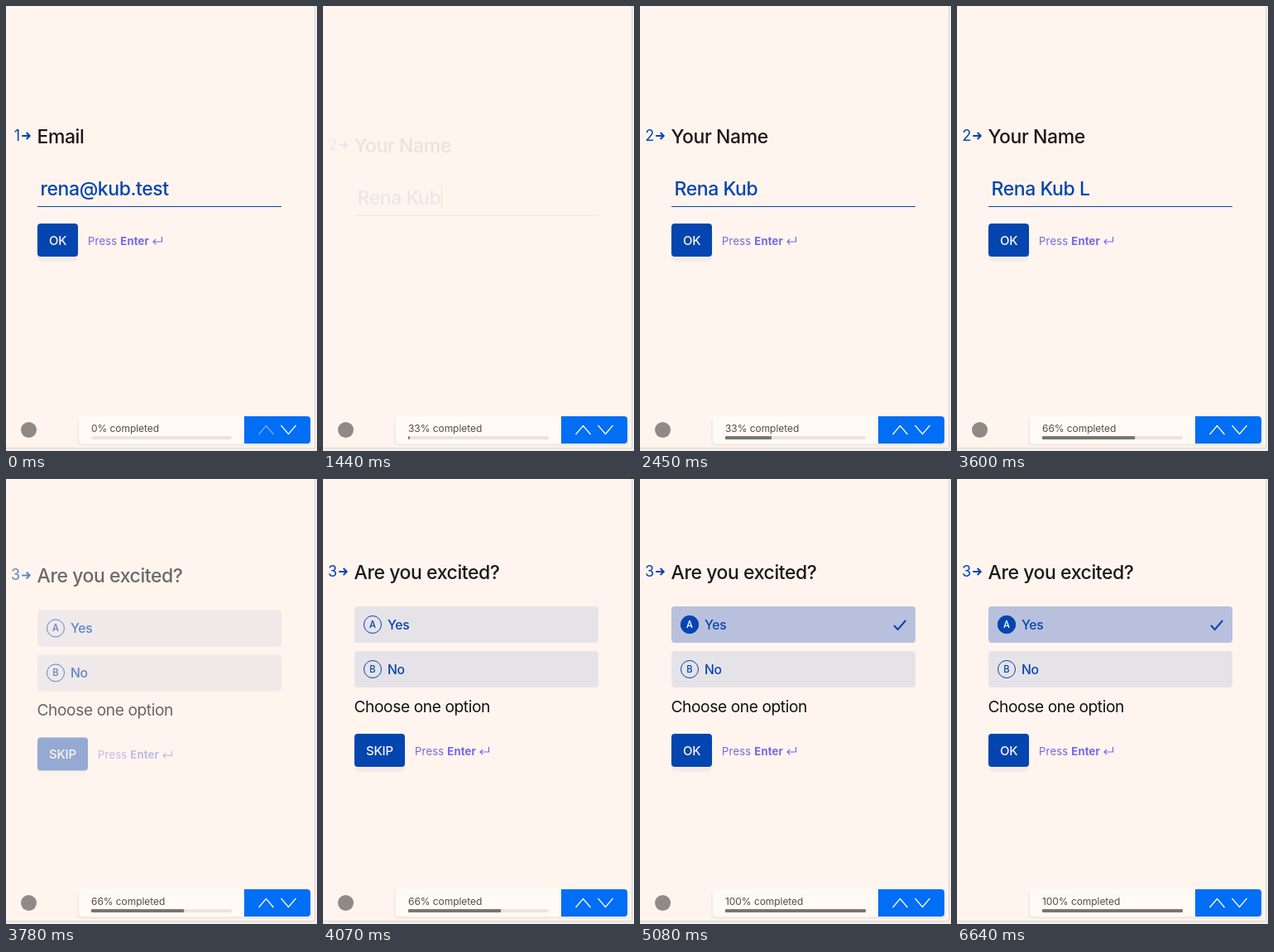
An HTML page that plays this animation: 376 px wide and 538 px high, repeating every 7480 ms.

```html
<!DOCTYPE html>
<html lang="en">
<head>
<meta charset="utf-8">
<title>Form walkthrough</title>
<style>
  html, body { margin: 0; width: 100%; height: 100%; overflow: hidden; background: #f1eeee; }
  svg { display: block; width: 376px; height: 538px; font-family: Inter, "Liberation Sans", sans-serif; font-optical-sizing: none; }
  text { white-space: pre; }
  .title, .answer { font-size: 23px; font-weight: 500; letter-spacing: -.43px; }
  .title { fill: #191919; }
  .answer, .num, .opt, .key { fill: #0445af; }
  .num { font-size: 18px; text-anchor: end; }
  .opt { font-size: 15.7px; font-weight: 500; letter-spacing: -.25px; }
  .key { font-size: 11.2px; font-weight: 500; text-anchor: middle; }
  .note { font-size: 19.2px; letter-spacing: -.42px; fill: #111; }
  .btn { font-size: 15px; font-weight: 500; letter-spacing: -.2px; fill: #fff6f0; }
  .hint { font-size: 13px; letter-spacing: .22px; fill: #6f66ee; }
  .hint tspan { font-weight: 700; }
  .small { font-size: 12px; letter-spacing: -.06px; fill: #514d49; }
  .line { fill: none; stroke: #0445af; stroke-width: 2; }
</style>
</head>
<body>
<svg id="stage" viewBox="0 0 376 538"></svg>
<script>
const LOOP = 7480, TICK = 57.5;
const BLUE = '#0445af';
const stage = document.getElementById('stage');

const text = (cls, x, y, s, extra = '') => `<text class="${cls}" x="${x}" y="${y}" ${extra}>${s}</text>`;
const rect = (x, y, w, h, fill, rx = 0, extra = '') =>
  `<rect x="${x}" y="${y}" width="${w}" height="${h}" rx="${rx}" fill="${fill}" ${extra}/>`;

const heading = (n, title, y) =>
  text('num', 17.2, y - 3, n) +
  `<path class="line" d="M19.2 ${y - 9}H28.5M24.7 ${y - 13}l4 4l-4 4"/>` +
  text('title', 37.5, y, title);

const button = (label, y, w, id = '') =>
  `<g id="${id}">` +
  rect(37, y + 3, w + 2, 43, '#000', 7, 'opacity=".04"') +
  rect(38, y, w, 40, BLUE, 4) +
  text('btn', 52, y + 26, label) +
  text('hint', w + 50, y + 26, 'Press <tspan>Enter</tspan>') +
  `<path d="M${w + 139.5} ${y + 16}v6h-10.5m3.2 -3.2l-3.2 3.2l3.2 3.2" fill="none" stroke="#6f66ee" stroke-width="1.2"/>` +
  '</g>';

const page = (id, body, foot) => `<g id="${id}"><g id="${id}Main">${body}</g><g id="${id}Foot">${foot}</g></g>`;

const field = (id, value) =>
  text('answer', 41.5, 229, value, `id="${id}"`) + rect(38, 242, 295, 1, BLUE);

const option = (key, label, y, pick = '') =>
  rect(38, y, 295, 44, '#e6e3e8', 4) + pick +
  `<circle cx="60" cy="${y + 22}" r="10.5" fill="none" stroke="${BLUE}"/>` +
  text('key', 60, y + 26, key, `id="key${key}"`) +
  text('opt', 78, y + 28, label);

const picked = '<g id="picked">' + rect(38, 154, 295, 44, '#b9c0dd', 4) +
  `<circle cx="60" cy="176" r="11" fill="${BLUE}"/><path class="line" d="M307 177l4.7 5l9.5 -11"/></g>`;

stage.innerHTML =
  rect(0, 0, 376, 538, '#f1eeee') +
  rect(-2, -2, 375.5, 536.5, '#fff5ee', 0, 'stroke="#dcd6d3"') +
  page('p1', heading(1, 'Email', 166) + field('mail', 'rena@kub.test'), button('OK', 263, 49)) +
  page('p2', heading(2, 'Your Name', 166) + field('name', '') + rect(143, 206, 1, 28, '#222', 0, 'id="caret"'),
    button('OK', 263, 49)) +
  page('p3', heading(3, 'Are you excited?', 121) + option('A', 'Yes', 154, picked) + option('B', 'No', 208) +
    text('note', 37.5, 282, 'Choose one option'),
    button('SKIP', 308, 61, 'skip') + button('OK', 308, 49, 'done')) +
  '<circle id="dot" cx="27.5" cy="512.5" r="9.5" fill="#8f8a86"/>' +
  rect(86, 498, 284, 34, '#000', 5, 'opacity=".04"') +
  rect(88, 496, 204, 33, '#fffaf4', 4) +
  `<path d="M288 496h76a4 4 0 0 1 4 4v25a4 4 0 0 1 -4 4h-76z" fill="#006ef5"/>` +
  text('small', 103, 515, '', 'id="percent"') +
  rect(103, 520, 170, 4, '#e9e4de', 2) + rect(103, 520, 0, 4, '#7a7570', 1, 'id="bar"') +
  '<g fill="none" stroke="#fff" stroke-width="1.3"><path id="up" d="M305.5 518l9 -10.5l9 10.5"/><path d="M332.5 507l9 10.5l9 -10.5"/></g>';

const el = {};
stage.querySelectorAll('[id]').forEach(n => { if (n.id) el[n.id] = n; });
const set = (id, name, value) => el[id].setAttribute(name, value);
const show = (id, on) => set(id, 'visibility', on ? 'visible' : 'hidden');
const write = (id, s) => { if (el[id].textContent !== s) el[id].textContent = s; };

const unit = (t, start, len) => Math.min(1, Math.max(0, (t - start) / len));
const easeOut = u => 1 - (1 - u) ** 2;

// cubic-bezier(.25, .1, .25, 1)
function ease(u) {
  const curve = (s, a, b) => 3 * a * s * (1 - s) ** 2 + 3 * b * s * s * (1 - s) + s ** 3;
  let lo = 0, hi = 1;
  for (let i = 0; i < 24; i++) {
    const mid = (lo + hi) / 2;
    if (curve(mid, .25, .25) < u) lo = mid; else hi = mid;
  }
  return curve(lo, .1, 1);
}

// Movement advances in ticks counted from the latest action.
const ACTIONS = [0, 1440, 2710, 3600, 4790];
function tick(t) {
  const from = ACTIONS.filter(a => a <= t).pop();
  return from + Math.floor((t - from) / TICK) * TICK;
}

function enter(id, t, start) {
  const k = easeOut(unit(t, start, 490));
  set(id, 'transform', `translate(0 ${(12 * (1 - k)).toFixed(2)})`);
  set(id + 'Main', 'opacity', k);
  set(id + 'Foot', 'opacity', easeOut(unit(t, start + 100, 390)));
}

function draw(t) {
  const q = tick(t);
  const current = q < 1440 ? 'p1' : q < 3650 ? 'p2' : 'p3';
  for (const id of ['p1', 'p2', 'p3']) set(id, 'display', id === current ? 'inline' : 'none');
  enter('p2', q, 1420);
  enter('p3', q, 3580);

  write('name', t < 2710 ? 'Rena Kub' : 'Rena Kub L');
  show('caret', t < 2450);

  const chosen = t >= 4790;
  set('picked', 'opacity', chosen ? ease(unit(q, 4740, 200)) : 0);
  el.keyA.style.fill = chosen ? '#fff' : BLUE;
  set('skip', 'display', chosen ? 'none' : 'inline');
  set('done', 'display', chosen ? 'inline' : 'none');

  const share = t < 1440 ? 0 : t < 2710 ? 33 : t < 4790 ? 66 : 100;
  write('percent', share + '% completed');
  const filled = 33 * ease(unit(q, 1420, 400)) + 33 * ease(unit(q, 2690, 400)) +
    (chosen ? 34 * ease(unit(q, 4760, 315)) : 0);
  set('bar', 'width', (1.7 * filled).toFixed(2));
  set('up', 'opacity', t < 1440 ? .45 : 1);
  show('dot', !(t >= 2710 && t < 3250) && t < 6640);
}

const began = performance.now();
function frame() {
  draw((performance.now() - began) % LOOP);
  requestAnimationFrame(frame);
}
frame();
</script>
</body>
</html>
```
